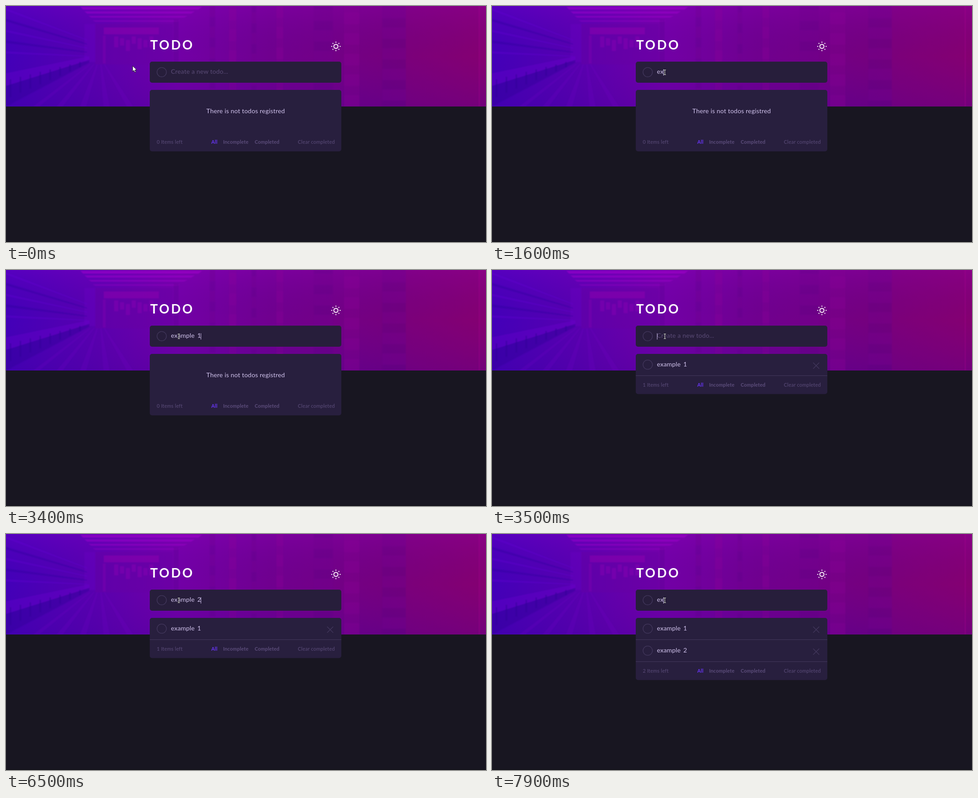
An HTML page that plays this animation: 1065x526 px, repeating every 8 s.

```html
<!DOCTYPE html>
<html lang="en">
<head>
<meta charset="utf-8">
<title>Todo</title>
<style>
html, body { margin: 0; width: 100%; height: 100%; overflow: hidden; background: #181621; }
svg { display: block; font: 14px Lato, sans-serif; letter-spacing: .2px; }
.small { font-size: 11px; letter-spacing: .23px; fill: #5c4d7b; }
.bold { font-size: 11px; font-weight: 700; letter-spacing: .15px; fill: #5c4d7b; }
.bright { fill: #d0c2ec; }
.item { word-spacing: 2px; }
.line { fill: none; stroke: #43385d; stroke-width: 1.3; }
</style>
</head>
<body>
<svg width="1065" height="526" viewBox="0 0 1065 526">
  <defs>
    <linearGradient id="sky">
      <stop offset="0" stop-color="#4300b9"/>
      <stop offset=".17" stop-color="#5700b0"/>
      <stop offset=".36" stop-color="#7200a6"/>
      <stop offset=".55" stop-color="#70008f"/>
      <stop offset=".78" stop-color="#75007f"/>
      <stop offset="1" stop-color="#840070"/>
    </linearGradient>
    <linearGradient id="shade" x2="0" y2="1">
      <stop offset="0" stop-color="#a000d8" stop-opacity=".2"/>
      <stop offset=".5" stop-color="#5000a0" stop-opacity="0"/>
      <stop offset="1" stop-color="#3c0098" stop-opacity=".25"/>
    </linearGradient>
    <clipPath id="top"><path d="M0 0H1065V224H0Z"/></clipPath>
    <filter id="soft"><feGaussianBlur stdDeviation="1.2"/></filter>
  </defs>
  <path d="M0 0H1065V224H0Z" fill="url(#sky)"/>
  <path d="M0 0H1065V224H0Z" fill="url(#shade)"/>
  <g clip-path="url(#top)"><g id="hall" filter="url(#soft)"></g></g>
  <path d="M0 524H1065V526H0Z" fill="#13121a"/>

  <text x="320" y="97" fill="#fff" style="font-size:28px;font-weight:700;letter-spacing:3.7px">TODO</text>
  <g id="sun" transform="translate(732 90)" fill="none" stroke="#fff" stroke-width="2">
    <circle r="4.6"/>
  </g>

  <rect x="319" y="124" width="425" height="47" rx="5" fill="#271e3b"/>
  <circle class="line" cx="345.5" cy="147.5" r="10.4"/>
  <text id="hint" x="366" y="151" fill="#5a4b76">Create a new todo...</text>
  <text id="input" class="bright item" x="366" y="151"></text>
  <path id="caret" d="M.5 141V155" stroke="#cbbde8"/>

  <rect id="card" x="319" y="187" width="425" rx="5" fill="#281f3e"/>
  <text id="empty" class="bright" x="531.7" y="238.5" text-anchor="middle">There is not todos registred</text>
  <g class="row">
    <circle class="line" cx="345.5" cy="211" r="10.4"/>
    <text class="bright item" x="366" y="214.5">example 1</text>
    <path class="line" d="M712.5 206.5L726 220M726 206.5L712.5 220"/>
    <path d="M319 235.5H744" stroke="#43385d"/>
  </g>
  <g class="row" transform="translate(0 49)">
    <circle class="line" cx="345.5" cy="211" r="10.4"/>
    <text class="bright item" x="366" y="214.5">example 2</text>
    <path class="line" d="M712.5 206.5L726 220M726 206.5L712.5 220"/>
    <path d="M319 235.5H744" stroke="#43385d"/>
  </g>
  <g id="foot">
    <text id="left" class="small" x="334.5"></text>
    <text class="bold" x="455.5" style="fill:#6735f2">All</text>
    <text class="bold" x="481.7">Incomplete</text>
    <text class="bold" x="551.7">Completed</text>
    <text class="small" x="647.5">Clear completed</text>
  </g>

  <path id="arrow" d="M0 0V12.5L2.9 9.8L5 14.5L7 13.6L5 9H9Z" fill="#fff" stroke="#111" stroke-width=".9"/>
  <g id="beam" fill="none">
    <path d="M381 142.5H386M383.5 142.5V153M381 153H386" stroke="#15121c" stroke-width="2.6"/>
    <path d="M381 142.5H386M383.5 142.5V153M381 153H386" stroke="#eee" stroke-width="1"/>
  </g>
</svg>
<script>
const $ = id => document.getElementById(id);
const show = (el, on) => el.style.display = on ? '' : 'none';
const LOOP = 8000, WORD = 'example\u00a0';

function draw(parent, d, fill, opacity) {
  const p = document.createElementNS('http://www.w3.org/2000/svg', 'path');
  p.setAttribute('d', d);
  p.setAttribute('fill', fill);
  p.setAttribute('opacity', opacity);
  parent.append(p);
  return p;
}
const box = (x, y, w, h, fill, opacity) => draw($('hall'), `M${x} ${y}h${w}v${h}h${-w}Z`, fill, opacity);

// Corridor: ceiling lights, far end, sign
for (let i = 0; i < 4; i++) {
  const y = 2 + i * 10, x = 165 + i * 9, h = 6 - i;
  draw($('hall'), `M${x} ${y}H${435 - i * 16}l-8 ${h}H${x + 6}Z`, '#a800d0', .5 - i * .07);
}
box(198, 40, 172, 90, '#6800a2', .4);
box(217, 48, 122, 15, '#9200b0', .45);
box(215, 66, 6, 62, '#8a00b4', .3);
for (let i = 0; i < 7; i++) box(240 + i * 13, 68 + i % 3 * 4, 9, 24 - i % 2 * 8, '#9a00b8', .3);
box(174, 40, 24, 85, '#6a00c4', .35);
box(372, 30, 11, 140, '#5d0092', .3);

// Left wall, railing and floor
for (let i = 0; i < 5; i++) {
  draw($('hall'), `M0 ${5 + i * 24}L180 ${75 + i * 9}v2L0 ${10 + i * 24}Z`, i % 2 ? '#2c009a' : '#6500d0', .35);
}
draw($('hall'), 'M0 150L185 112V120L0 178Z', '#7000d4', .3);
draw($('hall'), 'M0 178L185 120V126L0 224Z', '#30009a', .4);
for (let i = 0; i < 8; i++) box(8 + i * 22, 163 - i * 5.5, 4, 40 - i * 4, '#2c0092', .35);
for (let i = 0; i < 5; i++) {
  draw($('hall'), `M${185 + i * 8} 130L${60 + i * 52} 224h14L${188 + i * 8} 130Z`, '#7400c8', .2);
}

// Columns on the right wall
[[452, 12], [495, 16], [545, 10], [600, 15], [683, 42], [750, 34], [835, 52]].forEach(([x, w], i) => {
  box(x, 0, w, 224, i % 2 ? '#8a0094' : '#520084', .22);
  for (let y = i * 7 % 20; y < 224; y += 46) box(x, y, w, 25, '#9a00a0', .13);
});
box(887, 0, 160, 224, '#850078', .2);
box(1049, 0, 2, 224, '#a00088', .6);

for (let i = 0; i < 8; i++) {
  draw($('sun'), 'M0 -8.2V-10.4', 'none', 1).setAttribute('transform', `rotate(${i * 45})`);
}

// [time, typed characters]
const KEYS = [[0, 0], [1300, 1], [1600, 2], [1700, 3], [1800, 4], [2000, 5], [2100, 6], [2300, 7], [3400, 9],
  [3500, 0], [4100, 1], [4500, 3], [4800, 4], [5100, 6], [5900, 7], [6300, 8], [6500, 9],
  [6800, 0], [7500, 1], [7900, 2]];
const CARET = [[900, 3800], [4100, 5600], [5900, 7100], [7500, 8000]];
const MOUSE = [[281, 133.5], [308, 138], [348, 142], [385, 144]];
const rows = document.querySelectorAll('.row');

function render(t) {
  const count = t < 3500 ? 0 : t < 6800 ? 1 : 2;
  const typed = KEYS.findLast(k => k[0] <= t)[1];
  $('input').textContent = (WORD + (count + 1)).slice(0, typed);
  show($('hint'), !typed);
  show($('caret'), CARET.some(([a, b]) => t >= a && t < b));
  const width = typed ? $('input').getComputedTextLength() : 0;
  $('caret').setAttribute('transform', `translate(${366 + Math.floor(width)} 0)`);

  const bottom = count ? 227.5 + 49 * count : 324;
  $('card').setAttribute('height', bottom - 187);
  $('foot').setAttribute('transform', `translate(0 ${bottom - 17})`);
  $('left').textContent = count + ' Items left';
  show($('empty'), !count);
  rows.forEach((row, i) => show(row, i < count));

  show($('arrow'), t < 400);
  show($('beam'), t >= 400);
  $('arrow').setAttribute('transform', `translate(${MOUSE[Math.min(3, Math.floor(t / 100))]})`);
}

const start = performance.now();
function tick() {
  render((performance.now() - start) % LOOP);
  requestAnimationFrame(tick);
}
tick();
</script>
</body>
</html>
```
